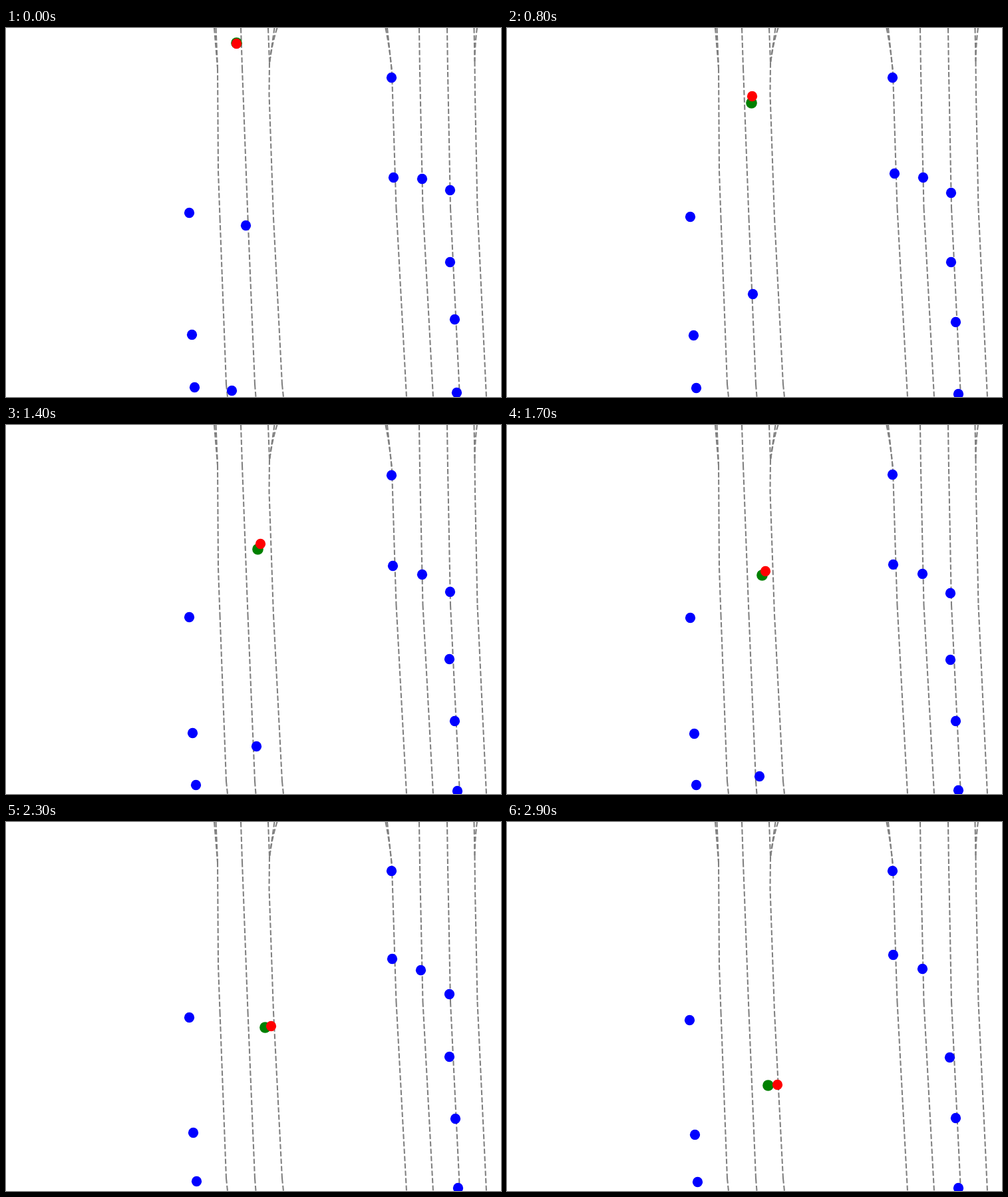
Recreate the animation shown at these times as an HTML page. Size 744 by 554 pixels, loop 3 s.

```html
<!DOCTYPE html>
<html lang="en">
<head>
<meta charset="utf-8">
<title>Lane traffic</title>
<style>
  html, body { margin: 0; width: 100%; height: 100%; overflow: hidden; background: #fff; }
  svg { display: block; width: 744px; height: 554px; }
  .lanes { fill: none; stroke: #808080; stroke-width: 2.08; stroke-dasharray: 7.71 3.33; }
</style>
</head>
<body>
<svg viewBox="0 0 744 554">
  <!-- Each lane section is its own subpath, so its dashes start afresh. -->
  <g class="lanes">
    <path d="M313 0L318 60M318 60L319 215L321.5 285M321.5 285L331 535M331 535L333 554"/>
    <path d="M315.5 0L318 60"/>
    <path d="M353 0L355 60M355 60L363.5 285M363.5 285L374 535M374 535L375.5 554"/>
    <path d="M394 0L396 52M396 52L395.5 100L402 285M402 285L415 535M415 535L417 554"/>
    <path d="M403.5 0L396 52"/>
    <path d="M407.5 0Q399 26 396 55"/>
    <path d="M570.5 0Q577 32 580 66M580 66L584.5 210L586.5 270M586.5 270L602 554"/>
    <path d="M573 0L580 66"/>
    <path d="M621 0L622 66M622 66L626.5 270M626.5 270L642 554"/>
    <path d="M663 0L664 66M664 66L668 270M668 270L682 554"/>
    <path d="M703.5 0L704.5 50M704.5 50L705 100L708.5 270M708.5 270L722 554"/>
    <path d="M708 0Q705 22 704.5 50"/>
  </g>
  <g id="dots"></g>
</svg>
<script>
const LOOP = 3000, STEP = 100, STEPS = LOOP / STEP;
const layer = document.getElementById('dots');
const dots = [];

// x and y are polynomials of the step: start, speed, acceleration, ...
function dot(color, x, y, { r = 7.65, noise = 0, until = STEPS } = {}) {
  const el = document.createElementNS('http://www.w3.org/2000/svg', 'circle');
  el.setAttribute('r', r);
  el.setAttribute('fill', color);
  layer.append(el);
  dots.push({ el, x, y, noise, until, seed: dots.length + 1 });
}

const car = (x, y, opts) => dot('#00f', x, y, opts);
const slow = (x, y, until) => car(x, y, { noise: 1, until });

slow([275], [277, 0.7]);
slow([279, 0.08], [459.5, 0, 0.012]);
slow([283, 0.09], [539.5]);
slow([579], [74]);
slow([582, -0.08], [223.5, -0.85]);
slow([625, -0.05], [226.5, -0.23]);
slow([667.3, -0.05], [244, 0, 0.028], 26);
slow([667, -0.04], [350, 0.12]);
slow([674.5], [437, 0.7, -0.016]);
slow([678], [547, 0.1]);

car([339, 1], [544, 12.5]);
car([360, 1.25, -0.008], [296, 12.2, 0.08]);
dot('#008000', [346, 2.95, -0.047], [22.4, 10.65, 0.076], { r: 8.33 });
dot('#f00', [346, 3.05, -0.034], [23, 8, 0.27, -0.0036]);

const poly = (c, t) => c.reduceRight((sum, k) => sum * t + k, 0);

// Repeatable noise from -1 to 1
function rand(seed, n) {
  const v = Math.sin(seed * 127.1 + n * 311.7) * 43758.5453;
  return (v - Math.floor(v)) * 2 - 1;
}

// Dots sit on pixel centres.
const snap = v => Math.round(v) + 0.5;

function draw() {
  const t = Math.floor(performance.now() % LOOP / STEP);
  for (const { el, x, y, noise, until, seed } of dots) {
    el.setAttribute('cx', snap(poly(x, t) + 0.6 * noise * rand(seed, t)));
    el.setAttribute('cy', snap(poly(y, t) + noise * rand(seed, t + STEPS)));
    el.setAttribute('visibility', t < until ? 'visible' : 'hidden');
  }
  requestAnimationFrame(draw);
}
draw();
</script>
</body>
</html>
```
